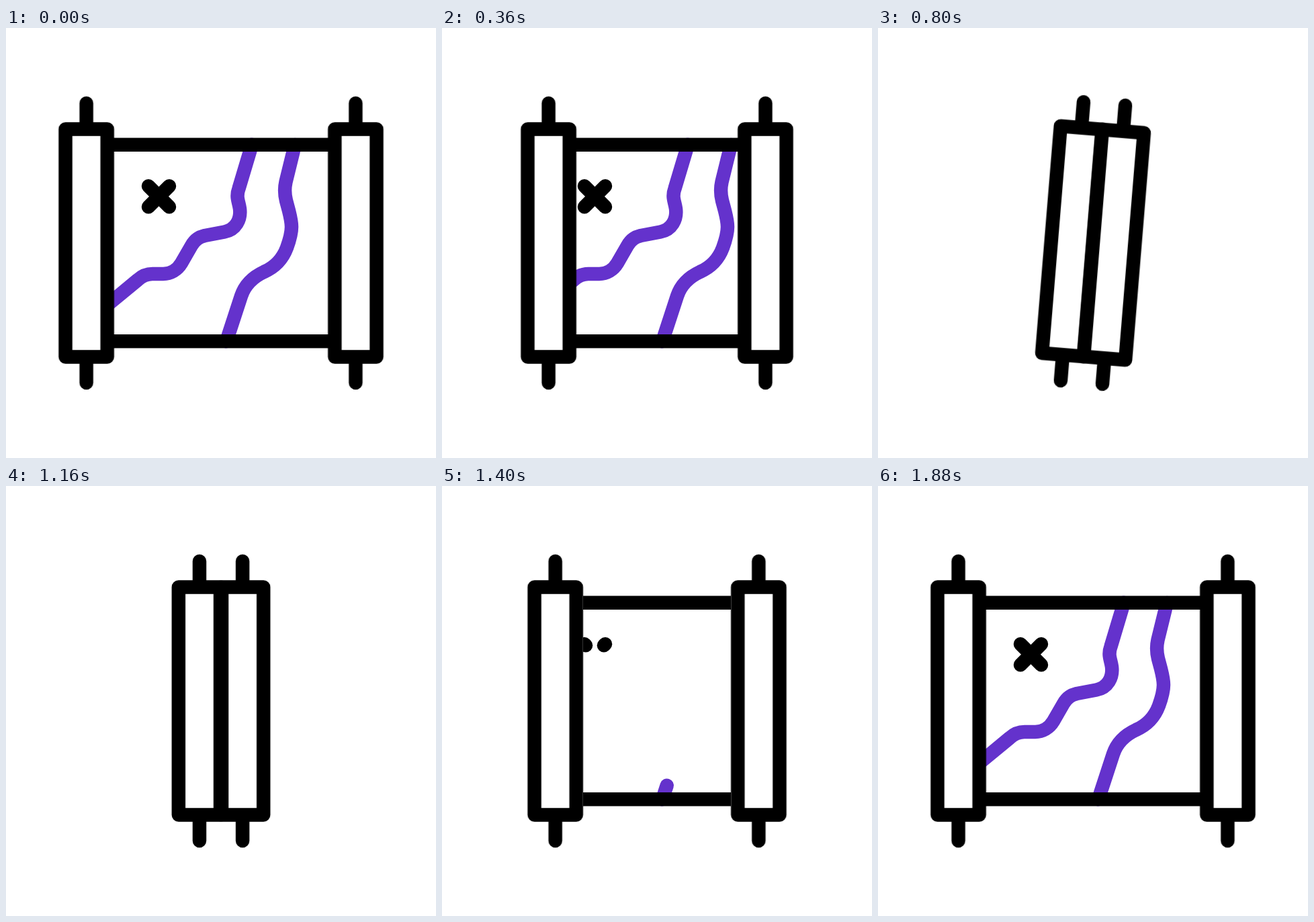
An HTML page for the animation above (2.4 s loop, 640 px wide and 640 px high).

```html
<!DOCTYPE html>
<html lang="en">
<head>
<meta charset="utf-8">
<title>Map scroll</title>
<style>
  html, body { margin: 0; height: 100%; overflow: hidden; background: #fff; }
  svg { display: block; width: 100vw; height: 100vh; }

  .ink { fill: none; stroke: #000; stroke-width: 20.5; stroke-linecap: round; stroke-linejoin: round; }
  .river { stroke: #6432cc; }
  .wood { fill: #fff; }

  #scroll, .roller, .draw, #window { animation: 2400ms linear infinite; }
  #scroll { transform-origin: 320px 320px; animation-name: wobble; }
  #window { transform-origin: 320px 320px; animation-name: window; }
  .draw { stroke-dasharray: 1 2; animation-name: draw; }
  .left { --open: 119.6px; --closed: 288.85px; animation-name: roll; }
  .right { --open: 520.4px; --closed: 351.15px; animation-name: roll; }

  /* Close 156–684 ms, open 1122–1602 ms */
  @keyframes roll {
    0% { transform: translateX(var(--open)); }
    6.5% { transform: translateX(var(--open)); animation-timing-function: cubic-bezier(.65, 0, .35, 1); }
    28.5% { transform: translateX(var(--closed)); }
    46.75% { transform: translateX(var(--closed)); animation-timing-function: cubic-bezier(.65, 0, .35, 1); }
    66.75%, 100% { transform: translateX(var(--open)); }
  }
  /* The visible paper follows the inner edges of the rollers */
  @keyframes window {
    0% { transform: scaleX(1); }
    6.5% { transform: scaleX(1); animation-timing-function: cubic-bezier(.65, 0, .35, 1); }
    28.5% { transform: scaleX(-.06413); }
    46.75% { transform: scaleX(-.06413); animation-timing-function: cubic-bezier(.65, 0, .35, 1); }
    66.75%, 100% { transform: scaleX(1); }
  }
  /* One sine swing, 660–1120 ms */
  @keyframes wobble {
    0% { transform: rotate(0deg); }
    27.5% { transform: rotate(0deg); animation-timing-function: cubic-bezier(.39, .575, .565, 1); }
    32.2917% { transform: rotate(5deg); animation-timing-function: cubic-bezier(.37, 0, .63, 1); }
    41.875% { transform: rotate(-5deg); animation-timing-function: cubic-bezier(.47, 0, .745, .715); }
    46.6667%, 100% { transform: rotate(0deg); }
  }
  /* Erased while rolled up, redrawn 1246–1886 ms */
  @keyframes draw {
    0%, 40% { stroke-dashoffset: 0; }
    40.01% { stroke-dashoffset: 1; }
    51.9167% { stroke-dashoffset: 1; animation-timing-function: cubic-bezier(.65, 0, .35, 1); }
    78.5833%, 100% { stroke-dashoffset: 0; }
  }
</style>
</head>
<body>
<svg viewBox="0 0 640 640">
  <defs>
    <clipPath id="paper">
      <rect id="window" x="160.95" y="100" width="318.1" height="440"/>
    </clipPath>
    <g id="rod" class="ink">
      <path d="M0 112V150M0 490V528"/>
      <rect class="wood" x="-31.1" y="150.4" width="62.2" height="339.2"/>
    </g>
  </defs>
  <g id="scroll">
    <g class="ink" clip-path="url(#paper)">
      <path class="river draw" pathLength="1" d="M150 413L196 375C203 368.5 209 366 218 366H234C245 366 255 360 261 350L276 324C282 314 288 311 296 309L325 303.5C342 300 350 285 348 269C347 262 344.5 256 344.5 250C344.5 246 345 243 346.5 239L366 173.8"/>
      <path class="river draw" pathLength="1" d="M328 466.2L350 399C356 381 369 370 384 363C400 356 412 343 418 327C422 316 425 306 425 296C425 288 423 280 421 272L417 257C414.5 247 414.5 238 416.5 229L430 174"/>
      <path class="draw" pathLength="1" d="M212 235.2L243 266.2"/>
      <path class="draw" pathLength="1" d="M243 235.2L212 266.2"/>
      <path d="M120 173.8H520M120 466.2H520"/>
    </g>
    <g class="roller left"><use href="#rod"/></g>
    <g class="roller right"><use href="#rod"/></g>
  </g>
</svg>
</body>
</html>
```
